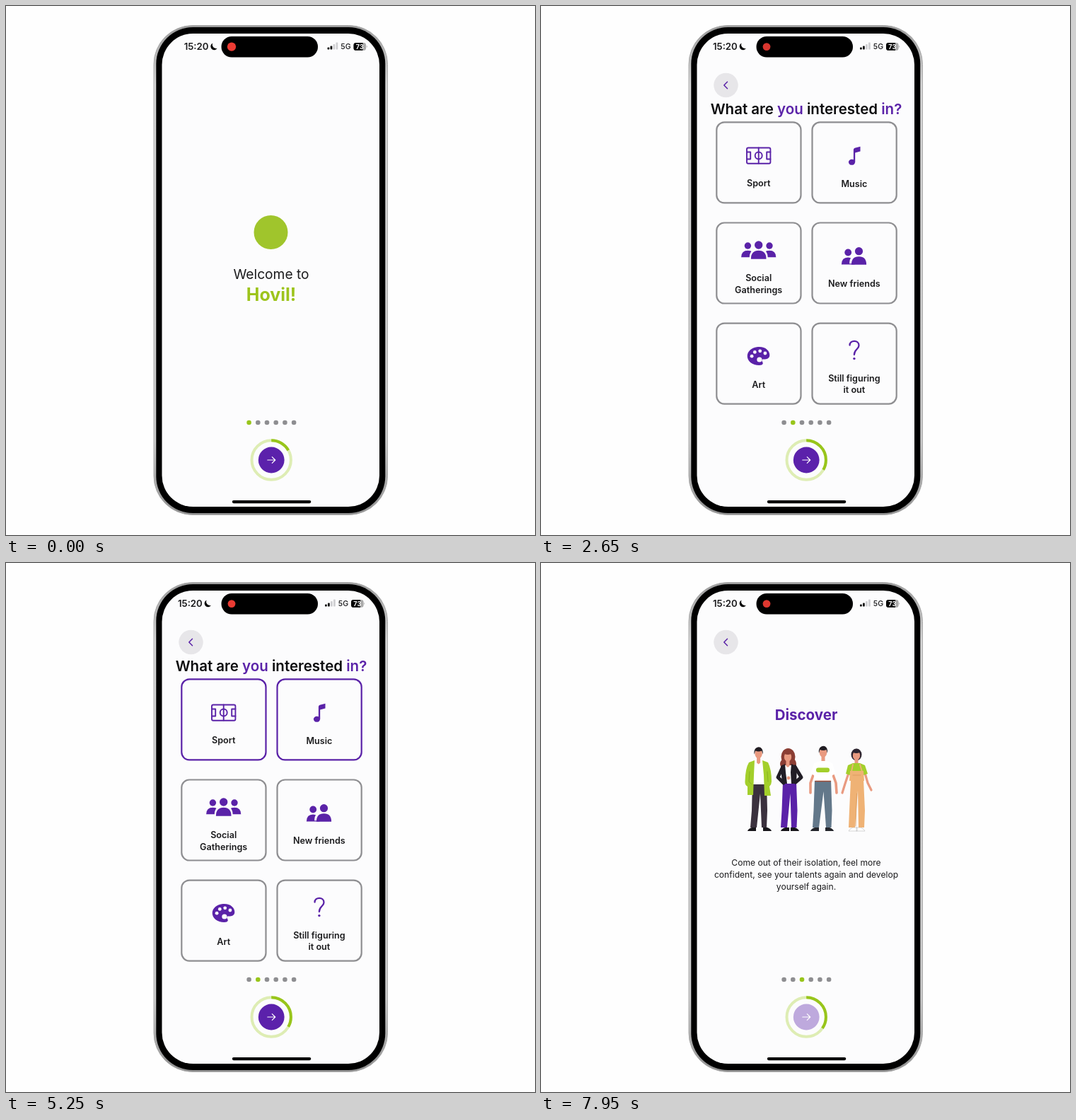
Recreate the animation shown at these times as an HTML page. Size 748 by 748 pixels, loop 8 s.

```html
<!DOCTYPE html>
<html lang="en">
<head>
<meta charset="utf-8">
<title>Onboarding</title>
<style>
  html, body { margin: 0; width: 100%; height: 100%; overflow: hidden; background: #fefefe; }
  svg { display: block; width: 100%; height: 100%; }
  text { font-family: Inter, "Open Sans", sans-serif; fill: #1b1b1d; }
  .mid { text-anchor: middle; }
  .title { font-size: 20.5px; font-weight: 600; }
  .label { font-size: 12.6px; font-weight: 600; }
  .line { fill: none; stroke: #5a22a8; stroke-linecap: round; stroke-linejoin: round; }
</style>
</head>
<body>
<svg id="stage" viewBox="0 0 748 748">
  <defs>
    <linearGradient id="steel" x2="0" y2="1">
      <stop offset="0" stop-color="#9b9b9b"/>
      <stop offset=".12" stop-color="#d6d6d6"/>
      <stop offset=".85" stop-color="#cbcbcb"/>
      <stop offset="1" stop-color="#8f8f8f"/>
    </linearGradient>
  </defs>
  <rect x="209" y="27.5" width="330.5" height="692" rx="55" fill="url(#steel)" stroke="#aaa" stroke-width="1"/>
  <rect x="212.3" y="30" width="324" height="687" rx="52"/>
  <rect x="220.5" y="39" width="307.5" height="669" rx="44" fill="#fcfcfd"/>
  <rect x="304.5" y="43" width="136.5" height="29.5" rx="14.7"/>
  <circle id="rec" cx="319" cy="57.6" fill="#ec3b33"/>
  <g id="clock">
    <text x="243" y="62.2" font-size="13.2" font-weight="600">15:20</text>
    <path d="M283.6 52.6a5 5 0 1 0 6.3 7.1a5.2 5.2 0 0 1 -6.3 -7.1z"/>
  </g>
  <g id="signal">
    <text x="469.8" y="61.4" font-size="10.6" font-weight="500">5G</text>
    <rect x="488" y="52" width="17.6" height="10.8" rx="3.4" fill="#aaa"/>
    <path d="M491.4 52H501V62.8H491.4a3.4 3.4 0 0 1 -3.4 -3.4V55.4a3.4 3.4 0 0 1 3.4 -3.4z"/>
    <path d="M506.4 55.6q1.8 1.8 0 3.6z" fill="#aaa"/>
    <text class="mid" x="496.8" y="60.7" font-size="9" font-weight="700" style="fill:#fff">73</text>
  </g>
  <g id="back">
    <circle cx="261.5" cy="112" r="17.2" fill="#e7e6e9"/>
    <path class="line" d="M263.5 107.3L258.8 112L263.5 116.7" stroke-width="1.5"/>
  </g>

  <g class="page">
    <circle cx="374.5" cy="320" r="24" fill="#a0c52c"/>
    <text class="mid" x="375" y="386.3" font-size="19.2">Welcome to</text>
    <text class="mid" x="375" y="417" font-size="25" font-weight="700" style="fill:#9dc41c">Hovil!</text>
  </g>
  <g class="page" id="interests">
    <text class="title mid" x="375" y="152.7" style="fill:#0c0c0e">What are <tspan fill="#5a22a8">you</tspan> interested <tspan fill="#5a22a8">in?</tspan></text>
  </g>
  <g class="page" id="discover">
    <text class="title mid" x="375" y="221.6" style="fill:#5a22a8;font-weight:650">Discover</text>
  </g>

  <g id="dots"></g>
  <g fill="none" stroke-width="4">
    <circle cx="375.2" cy="642" r="27.7" stroke="#deedb4"/>
    <circle id="ring" cx="375.2" cy="642" r="27.7" stroke="#98c51b" pathLength="360" transform="rotate(-90 375.2 642)"/>
  </g>
  <g id="next">
    <circle cx="375.2" cy="642" r="18.4" fill="#5b21ab"/>
    <path d="M369.8 642H380.6M376.3 637.6L380.7 642L376.3 646.4" fill="none" stroke="#fff" stroke-width="1.2" stroke-linecap="round" stroke-linejoin="round"/>
  </g>
  <rect x="319.8" y="699" width="111.5" height="4.2" rx="2.1"/>
</svg>
<script>
const LOOP = 8000, PURPLE = '#5a22a8', GREY = '#8e8e91', GREEN = '#98c51b', SKIN = '#e99a80';
const $ = id => document.getElementById(id);
const add = (id, markup) => $(id).insertAdjacentHTML('beforeend', markup);

const fill = (color, d) => `<path fill="${color}" d="${d}"/>`;
const disc = (color, x, y, r, ry = r) => `<ellipse fill="${color}" cx="${x}" cy="${y}" rx="${r}" ry="${ry}"/>`;
const limb = (color, d, w = 4) =>
  `<path fill="none" stroke="${color}" stroke-width="${w}" stroke-linecap="round" stroke-linejoin="round" d="${d}"/>`;

// Status bar signal and page dots
[3, 5, 7.5, 10].forEach((h, i) => add('signal',
  `<rect x="${451 + i * 4}" y="${61.6 - h}" width="2.8" height="${h}" rx=".8" fill="${i < 2 ? '#111' : '#cfcfd2'}"/>`));
for (let i = 0; i < 6; i++) add('dots', disc(GREY, 343.6 + i * 12.7, 589, 3.3));

// Icons, drawn around the centre of each one
const bust = (x, y, r, w, h) => disc(PURPLE, x, y, r) +
  fill(PURPLE, `M${x - w} ${y + r + 2 + h}q0 ${-h} ${w} ${-h}t${w} ${h}z`);
const halo = (x, y, w, h) =>
  `<path fill="#fcfcfd" d="M${x - w} ${y}q0 ${-h} ${w} ${-h}t${w} ${h}z"/>`;
const icons = {
  pitch: `<g class="line" stroke-width="1.9"><rect x="-16.7" y="-11" width="33.4" height="22.2" rx="2"/>
    <path d="M0 -11V11M-16.7 -5H-11.5V5H-16.7M16.7 -5H11.5V5H16.7"/><circle r="5"/></g>`,
  note: disc(PURPLE, -3.4, 9, 4.6, 4) + fill(PURPLE, 'M-1 9V-8.6Q-1 -10.4 .8 -11L8.6 -13V-6.4L1.3 -4.3V9z'),
  group: bust(-15.3, -6, 4.7, 9.3, 9.6) + bust(15.3, -6, 4.7, 9.3, 9.6) + halo(0, 11.3, 13, 13.4) + bust(0, -7, 5.7, 10.8, 12),
  pair: bust(-8.7, -4.5, 4.9, 9.3, 10) + halo(6.6, 11.3, 13.4, 13) + bust(6.6, -6.3, 5.6, 10.6, 11.4),
  palette: fill(PURPLE, 'M-1 -13C9 -14 16 -8 15.6 -1C15.4 4 10 4.6 7 4.4C3.6 4.2 4.8 7 5.6 8.6C7 11.6 5 13 1 13C-9 13 -16 7 -16 0C-16 -7 -9 -12.4 -1 -13z') +
    [[-9.6, .2], [-5.4, -5.6], [2, -7.2], [9.2, -4]].map(([x, y]) => disc('#fcfcfd', x, y, 2.4)).join('') +
    disc('#fcfcfd', 1.2, 5, 3.6),
  query: `<path class="line" stroke-width="2.3" d="M-6.4 -7.4C-6.2 -15.2 6.6 -15.2 6.6 -7C6.6 -1.6 0 -1.6 0 6"/>` + disc(PURPLE, 0, 11.6, 1.7)
};

// [icon, icon height, label lines, first baseline]
const cards = [
  ['pitch', 211.5, ['Sport'], 254.8], ['note', 211.8, ['Music'], 255.8],
  ['group', 345, ['Social', 'Gatherings'], 389], ['pair', 353, ['New friends'], 397],
  ['palette', 495, ['Art'], 539.5], ['query', 487, ['Still figuring', 'it out'], 530.5]
];
cards.forEach(([icon, iconY, lines, base], i) => {
  const x = 248.3 + i % 2 * 135.2, y = 164.4 + (i >> 1) * 142.1, cx = x + 59.4;
  add('interests', `<g class="card"><rect x="${x}" y="${y}" width="119.2" height="114" rx="11" fill="none" stroke-width="2.2"/>
    <g transform="translate(${cx} ${iconY})">${icons[icon]}</g>
    ${lines.map((s, n) => `<text class="label mid" x="${cx}" y="${base + n * 16.6}">${s}</text>`).join('')}</g>`);
});

// People on the third page
const trousers = (color, l, r, top, spread) => {
  const c = (l + r) / 2;
  return fill(color, `M${l} ${top}H${r}L${r + spread} 350L${r + spread - 1} 374H${r - 7}L${c + 1} ${top + 16}L${l + 6} 374H${l - 3}L${l - spread} 350z`);
};
const shoes = (color, l, r, edge = 'none') =>
  `<path fill="${color}" stroke="${edge}" stroke-width=".6" d="M${l - 7} 379q1 -3 6 -5h6v5zM${r + 7} 379q-1 -3 -6 -5h-6v5z"/>`;
const head = (x, y, hair) => fill(SKIN, `M${x - 2.5} ${y + 4}h5v9l-2.5 2l-2.5 -2z`) + disc(SKIN, x, y, 5.2, 6.6) +
  fill(hair, `M${x - 6} ${y + 1}C${x - 8} ${y - 12} ${x + 8} ${y - 13} ${x + 6} ${y + 1}L${x + 4.5} ${y - 4}Q${x} ${y - 2} ${x - 4.5} ${y - 4}z`);

add('discover',
  // Green jacket
  shoes('#17151a', 299, 319) + trousers('#3b313e', 299, 319, 310, 1) +
  fill('#fff', 'M300 280H316V313H300z') + head(307.6, 269.5, '#211c22') +
  fill('#a3cf2b', 'M302 279L294 282Q289 290 288.5 309Q288 314 292 316V328H300L301 300z') +
  fill('#a3cf2b', 'M313 279L321 282Q326 292 326 309Q326 313 323 316L325 329H316L315 300z') +
  limb('#83ab20', 'M295 295L294 309L298 313M320 295L321 309', .8) +
  // Black jacket
  disc('#8b3e34', 349.5, 274, 10, 12) + disc('#8b3e34', 356, 284, 5, 7) + disc('#8b3e34', 342.5, 284, 4.5, 6) +
  shoes('#17151a', 346, 358) + trousers('#5a22a8', 342, 361, 310, 1.5) +
  fill('#fff', 'M345 286H356V312H345z') + head(349, 274, '#8b3e34') +
  limb('#211d25', 'M342 288L335 303L343 311M359 288L368 303L360 310', 5) +
  fill('#211d25', 'M345 284L339 288L341 312H348L346 296zM354 284L362 288L361 312H354L353 296z') +
  disc(SKIN, 350, 304, 2.4) +
  // White shirt
  limb(SKIN, 'M386 297L381 311V325M412 297L417 311L418 325', 3.6) +
  shoes('#23252b', 388, 407) + trousers('#63788a', 387, 410, 307, 1.5) + head(399, 268, '#201c22') +
  fill('#fff', 'M394 280L386 283L381 298L386 300L387 308H411L412 300L417 298L412 283L404 280z') +
  `<rect x="389" y="289.5" width="19" height="6.5" rx="3" fill="#a3cf2b"/>` +
  limb('#a14b35', 'M388 308.5H409.5', 1.4) +
  // Overalls
  disc('#2e2530', 446, 271, 7.5, 8.5) + limb(SKIN, 'M435 297L430 312L426 325M458 297L462 311L467 321', 3.2) +
  shoes('#fff', 442, 451, '#bbb') + trousers('#efb275', 438, 456, 306, 2) + head(446, 272, '#2e2530') +
  fill('#a3cf2b', 'M441 283L434 286L431 298L437 300V308H456V300L462 298L458 286L451 283z') +
  fill('#efb275', 'M437 294H456L457 308H436z') + limb('#efb275', 'M439 295L441 285M454 295L451 285', 1.8) +
  limb('#d9995b', 'M441 300H452M446.5 326L445 372', .8));
['Come out of their isolation, feel more', 'confident, see your talents again and develop', 'yourself again.']
  .forEach((s, i) => add('discover', `<text class="mid" x="375" y="${428.3 + i * 16.7}" font-size="12.1">${s}</text>`));

// Taps: [finger down, finger up]
const cardTaps = { 0: [4400, 4617], 1: [3650, 3800], 3: [6720, 6837] };
const nextTaps = [[1850, 2130], [7600, 7868]];

const ease = x => {
  x = Math.min(1, Math.max(0, x));
  return x < .5 ? 2 * x * x : 1 - 2 * (1 - x) ** 2;
};
const fade = (t, [down, up]) => 1 - .8 * (ease((t - down) / 150) - ease((t - up) / 250));

const pages = document.querySelectorAll('.page');
const cardEls = document.querySelectorAll('.card');
const dots = $('dots').children;

function draw(t) {
  const page = nextTaps.filter(([, up]) => t >= up).length;
  pages.forEach((el, i) => el.setAttribute('display', i === page ? 'inline' : 'none'));
  $('back').setAttribute('display', page ? 'inline' : 'none');
  [...dots].forEach((el, i) => el.setAttribute('fill', i === page ? GREEN : GREY));

  const arc = 60 + nextTaps.reduce((sum, [, up]) => sum + 60 * ease((t - up) / 400), 0);
  $('ring').setAttribute('stroke-dasharray', `${arc} 360`);
  $('next').setAttribute('opacity', nextTaps.reduce((o, tap) => o * fade(t, tap), 1));

  cardEls.forEach((el, i) => {
    const tap = cardTaps[i];
    el.firstChild.setAttribute('stroke', tap && t >= tap[1] ? PURPLE : GREY);
    el.setAttribute('opacity', tap ? fade(t, tap) : 1);
  });

  const shift = 1 - ease((t - 30) / 520);
  $('clock').setAttribute('transform', `translate(${8.7 * shift} 0)`);
  $('signal').setAttribute('transform', `translate(${3.5 * shift} 0)`);
  $('rec').setAttribute('r', 5.4 + .8 * shift);
  $('rec').setAttribute('opacity', .96 + .04 * Math.cos(t / 1700 * 2 * Math.PI));
}

const start = performance.now();
function tick() {
  draw((performance.now() - start) % LOOP);
  requestAnimationFrame(tick);
}
tick();
</script>
</body>
</html>
```
